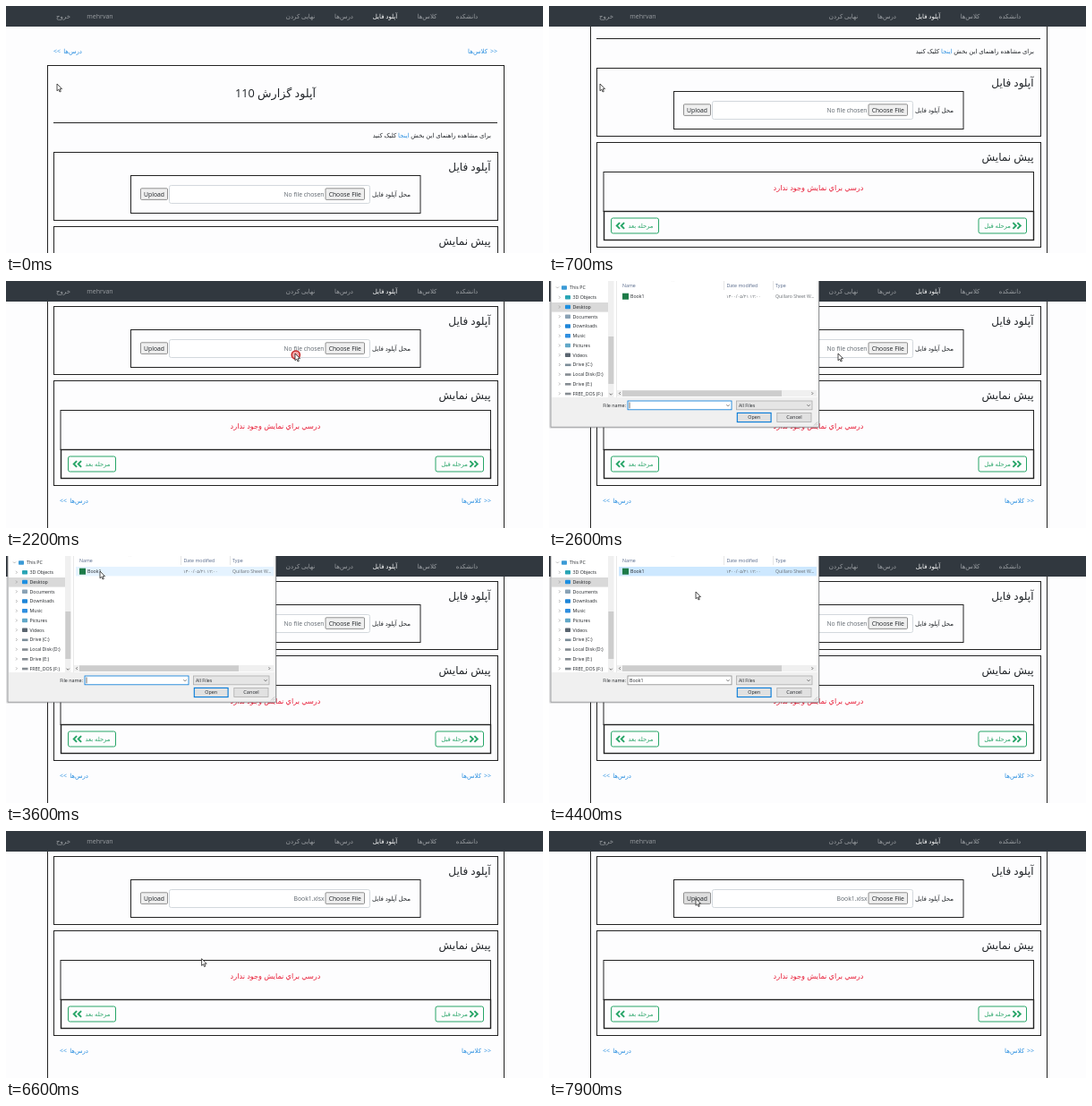
These frames come from a looping animation (600 px wide and 276 px high, 8000 ms). An HTML page:

```html
<!DOCTYPE html>
<html lang="fa">
<head>
<meta charset="utf-8">
<style>
html, body { margin: 0; width: 100%; height: 100%; overflow: hidden; background: #fdfdfe; }
svg { display: block; width: 100%; height: 100%; font-family: "Open Sans", "DejaVu Sans", sans-serif; }
</style>
</head>
<body>
<svg id="stage" viewBox="0 0 600 276"></svg>
<script>
const LOOP = 8000, INK = '#202428', LINK = '#2a8fe0', GREEN = '#27a567', BLUE = '#0078d7';
const CLASSES = 'کلاس&zwnj;ها', LESSONS = 'درس&zwnj;ها';

const text = (x, y, str, size, fill = INK, anchor = 'start', more = '') =>
  `<text x="${x}" y="${y}" font-size="${size}" fill="${fill}" text-anchor="${anchor}" ${more}>${str}</text>`;
const rect = (x, y, w, h, fill = 'none', stroke = 'none', more = '') =>
  `<rect x="${x}" y="${y}" width="${w}" height="${h}" fill="${fill}" stroke="${stroke}" ${more}/>`;
const line = (d, stroke, width = 1, more = '') =>
  `<path d="${d}" fill="none" stroke="${stroke}" stroke-width="${width}" ${more}/>`;
const frame = (x, y, w, h, more) => rect(x, y, w, h, 'none', '#222', more);
const chevrons = (x, y, dir) => [0, 5].map(dx =>
  line(`M${x + dx - dir * 1.6} ${y - 3.4}l${dir * 3.4} 3.4l${-dir * 3.4} 3.4`, GREEN, 1.9)).join('');

function navbar() {
  const items = [[515, 'دانشکده'], [470.5, CLASSES], [423.5, 'آپلود فایل', '#fff'], [377.5, LESSONS],
    [329, 'نهایی کردن'], [105, 'mehrvan'], [64, 'خروج']];
  return rect(0, 0, 600, 23, '#31383f') +
    items.map(([x, str, fill = '#9a9ea2']) => text(x, 13.5, str, 7, fill, 'middle')).join('');
}

function links(left, right, y) {
  return text(left, y, '&lt;&lt;', 7, LINK) + text(left + 32, y, LESSONS, 7, LINK, 'end') +
    text(right, y, '&gt;&gt;', 7, LINK, 'end') + text(right - 11, y, CLASSES, 7, LINK, 'end');
}

function page() {
  const button = 'rx="1" stroke-width=".8"';
  return links(53, 549, 53) + frame(46.5, 66.5, 510, 500) +
    text(301, 102, 'آپلود گزارش 110', 12.7, INK, 'middle') +
    line('M53 130.5H549', '#222') +
    text(542, 146.5, `برای مشاهده راهنمای این بخش <tspan fill="${LINK}">اینجا</tspan> کلیک کنید`, 6.9, INK, 'end') +
    // upload panel
    frame(53.5, 163.5, 496, 76) + text(541.5, 183.5, 'آپلود فایل', 12, INK, 'end') +
    frame(139.5, 189.5, 323.5, 42) +
    text(452, 213, 'محل آپلود فایل', 7, INK, 'end') +
    rect(182.5, 200.5, 224, 20, '#fff', '#d3d8dd', 'rx="2"') +
    rect(357, 203.8, 43.5, 12.6, '#efefef', '#767676', button) +
    text(378.8, 212.7, 'Choose File', 6.8, INK, 'middle') +
    text(355.5, 212.7, '', 6.8, '#5c646c', 'end', 'id="chosen"') +
    rect(150.5, 203.8, 30, 12.6, '#efefef', '#767676', button + ' id="upload"') +
    text(165.5, 212.7, 'Upload', 6.8, INK, 'middle') +
    // preview panel
    frame(53.5, 246.5, 496, 117) + text(541.5, 266.5, 'پیش نمایش', 12, INK, 'end') +
    frame(61, 279.5, 480.5, 44) + frame(61.5, 323.5, 480, 32, 'stroke-width="1.4"') +
    text(301, 299.5, 'درسي براي نمايش وجود ندارد', 8.2, '#e8203a', 'middle') +
    rect(69.5, 331, 53, 17, 'none', GREEN, 'rx="2"') + chevrons(77.5, 339.5, -1) +
    text(116.5, 342, 'مرحله بعد', 6.8, GREEN, 'end') +
    rect(480, 331, 53.5, 17, 'none', GREEN, 'rx="2"') + chevrons(520, 339.5, 1) +
    text(516, 342, 'مرحله قبل', 6.8, GREEN, 'end') +
    links(60, 542, 382.5);
}

function dialog() {
  const places = [['This PC', '#3b9ad6'], ['3D Objects', '#2aa5b5'], ['Desktop', '#1d8fe0'], ['Documents', '#8aa2b5'],
    ['Downloads', '#1f86d8'], ['Music', '#2f8fe0'], ['Pictures', '#62a8c8'], ['Videos', '#5a6570'],
    ['Drive (C:)', '#7b8c98'], ['Local Disk (D:)', '#858c92'], ['Drive (E:)', '#858c92'], ['FREE_DOS (F:)', '#858c92']];
  const small = 5.25, head = '#56688a';
  const tree = places.map(([name, color], i) => {
    const y = 7.5 + i * 10.75, x = i ? 18 : 14;
    const icon = i > 7 ? rect(x, y - 1, 6.5, 2.6, color) : rect(x, y - 2.3, 6, 4.6, color, 'none', 'rx=".7"');
    const arrow = line(i ? `M11 ${y - 1.5}l1.5 1.5l-1.5 1.5` : `M8 ${y - 1}l1.5 1.5l1.5 -1.5`, '#888', .6);
    return icon + arrow + text(i ? 26.5 : 23, y + 1.9, name, small);
  }).join('');
  const down = (x, y) => line(`M${x - 1.6} ${y - .8}l1.6 1.6l1.6 -1.6`, '#555', .8);

  return rect(0, -120, 303, 285, '#000', 'none', 'opacity=".1" rx="2"') +
    rect(2, -120, 299.5, 283.2, '#f0f0f0', '#8a8d90', 'stroke-width=".8"') +
    rect(3, -50, 296.5, 180, '#fff') +
    rect(3, 24, 63, 10.6, '#d9d9d9') + tree +
    rect(66, -50, 6.5, 180, '#f0f0f0') + rect(66.3, 62, 6, 53, '#cdcdcd') + down(69.2, 126.5) +
    line('M75.5 -50V130', '#e4e4e4', .8) +
    text(82, 6.5, 'Name', small, head) + text(198.5, 6.5, 'Date modified', small, head) + text(253, 6.5, 'Type', small, head) +
    line('M195.5 0V10M250.5 0V10', '#e0e0e0', .8) + line('M137 0l1.5 -1.2l1.5 1.2', '#777', .6) +
    rect(78, 12, 221, 10.4, '#fff', 'none', 'id="row"') +
    rect(82, 13.7, 7, 7, '#1d7b48') + text(91, 19, 'Book1', small) +
    text(198, 19, '۱۴۰۰/۰۵/۲۱ ۱۲:۰۰', 5, '#686d72') + text(253, 19, 'Quillaro Sheet W...', 5.1, '#686d72') +
    rect(76, 122, 223, 7.2, '#f0f0f0') + rect(82, 122.3, 178, 6.6, '#cdcdcd') +
    line('M79.8 124.2l-1.4 1.4l1.4 1.4M293.5 124.2l1.4 1.4l-1.4 1.4', '#555', .8) +
    text(86, 140.9, 'File name:', 5.4, INK, 'end') +
    rect(88, 134, 116, 9.8, '#fff', BLUE, 'stroke-width=".8" id="field"') +
    rect(89.5, 135.2, 15.5, 7.4, BLUE, 'none', 'id="mark"') +
    text(90, 140.9, '', small, INK, 'start', 'id="name"') +
    line('M90 135.5V142.3', '#111', .6, 'id="caret"') + down(200, 139) +
    rect(209.5, 134, 84.5, 9.8, '#e5e5e5', '#adadad', 'stroke-width=".8"') +
    text(212, 140.9, 'All Files', small) + down(290, 139) +
    rect(210.3, 147.4, 37.8, 10.2, '#e1e1e1', BLUE, 'stroke-width="1.1"') + text(229.2, 154.4, 'Open', 5.4, INK, 'middle') +
    rect(254.8, 147.4, 38.2, 10.2, '#e1e1e1', '#adadad', 'stroke-width=".8"') + text(274, 154.4, 'Cancel', 5.6, INK, 'middle') +
    line('M296 161.5l4 -4M298.3 161.5l1.7 -1.7', '#aaa', .7);
}

const stage = document.getElementById('stage');
stage.innerHTML = `<rect width="600" height="276" fill="#fdfdfe"/><g id="page">${page()}</g>${navbar()}
  <g id="dialog">${dialog()}</g>
  <circle id="click" r="4.6" fill="#e23b3b" fill-opacity=".45" stroke="#c62828" stroke-width="1.5"/>
  <path id="cursor" d="M0 0V7.8L1.8 6.2L3 9L4.3 8.4L3.1 5.7H5.5Z" fill="#fff" stroke="#222" stroke-width=".8"/>`;
const el = Object.fromEntries([...stage.querySelectorAll('[id]')].map(e => [e.id, e]));
const set = (id, name, value) => el[id].setAttribute(name, value);
const show = (id, on) => set(id, 'visibility', on ? 'inherit' : 'hidden');

const clamp = p => Math.max(0, Math.min(1, p));
const smooth = p => p * p * (3 - 2 * p);

// keys: [time, ...values]
function track(keys, t, ease = p => p) {
  let i = 0;
  while (i < keys.length - 2 && t >= keys[i + 1][0]) i++;
  const [a, b] = [keys[i], keys[i + 1]];
  const p = ease(clamp((t - a[0]) / (b[0] - a[0])));
  return a.slice(1).map((v, k) => v + (b[k + 1] - v) * p);
}

const scrollKeys = [[200, 0], [700, 94], [1050, 135]];
const cursorKeys = [[950, 57, 87], [1400, 321, 82], [1900, 323, 81], [2900, 323, 81], [3600, 105, 17],
  [3980, 105, 17], [4400, 164, 40], [4750, 164, 40], [5300, 225, 150.5], [6400, 225, 150.5], [7400, 164, 75.5], [8000, 164, 75.5]];
const clicks = [2050, 3820, 5420];

function draw(t) {
  const [scroll] = track(scrollKeys, t);
  set('page', 'transform', `translate(0 ${-Math.round(scroll)})`);

  const [x, y] = track(cursorKeys, t, smooth);
  set('cursor', 'transform', `translate(${x} ${y})`);
  set('click', 'transform', `translate(${x + .8} ${y + 1.5})`);
  show('click', clicks.some(c => t >= c && t < c + 220));

  const open = clamp((t - 2250) / 200), close = clamp((t - 5540) / 200);
  const shown = open * (1 - close), zoom = .93 + .07 * shown;
  show('dialog', shown > 0);
  set('dialog', 'opacity', shown);
  set('dialog', 'transform', `translate(151.5 90) scale(${zoom}) translate(-151.5 -90)`);

  const picked = t >= 3850, confirmed = t >= 5450;
  const hover = x < 299 && y > 12 && y < 22.4;
  set('row', 'fill', confirmed ? '#d9d9d9' : picked ? '#cde8ff' : hover ? '#e5f3ff' : '#fff');
  set('field', 'stroke', picked && !confirmed ? '#8a8a8a' : BLUE);
  set('name', 'fill', confirmed ? '#fff' : INK);
  el.name.textContent = picked ? 'Book1' : '';
  show('mark', confirmed);
  show('caret', !picked && (t - 2450) % 1060 < 530);
  el.chosen.textContent = t < 5750 ? 'No file chosen' : 'Book1.xlsx';
  set('upload', 'fill', t > 6400 && x < 180 && y < 82 ? '#dedede' : '#efefef');
}

function tick(now) {
  draw(now % LOOP);
  requestAnimationFrame(tick);
}
draw(0);
requestAnimationFrame(tick);
</script>
</body>
</html>
```
